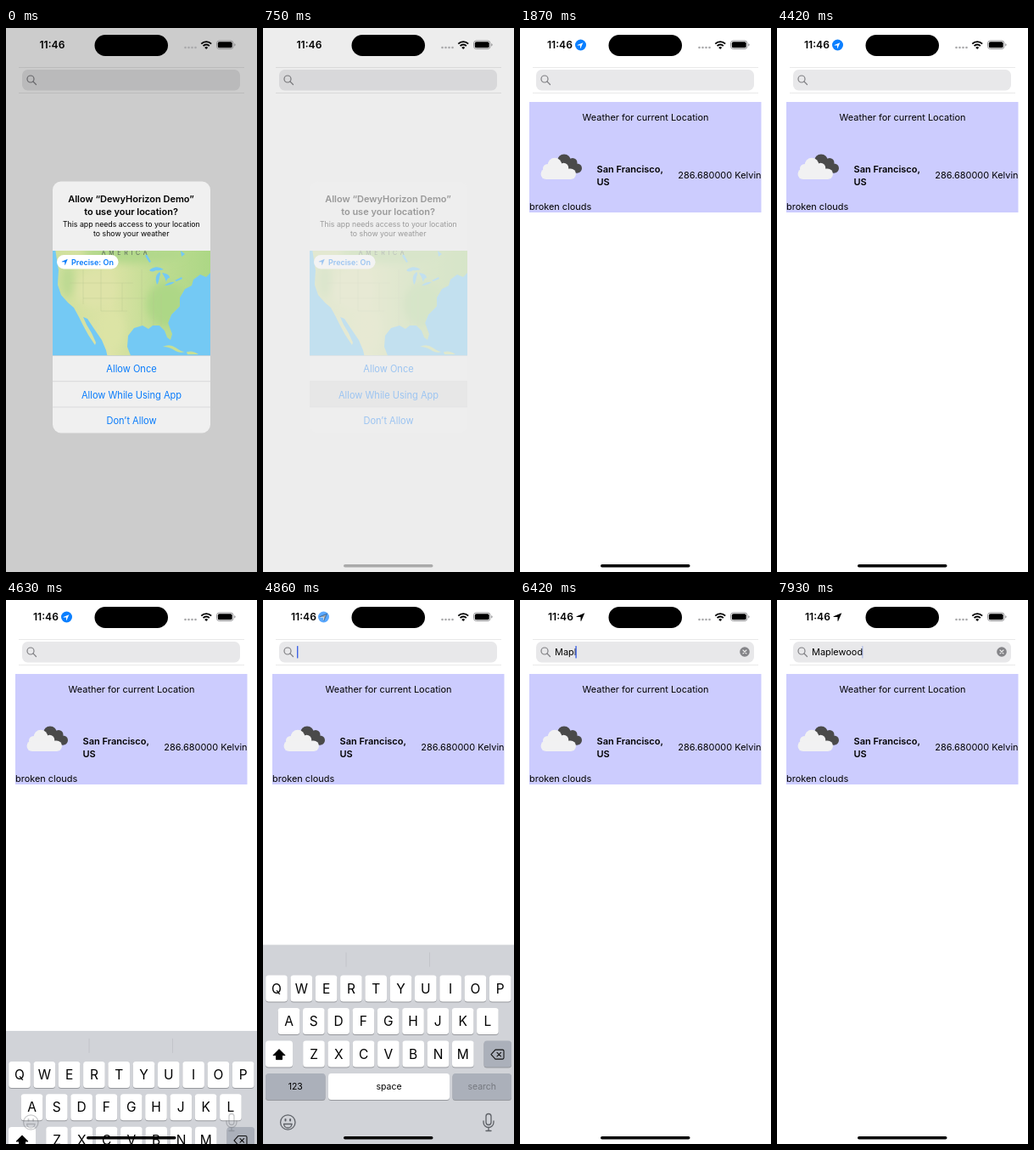
Recreate the animation shown at these times as an HTML page. Size 296 by 640 pixels, loop 8 s.

```html
<!DOCTYPE html>
<html lang="en">
<head>
<meta charset="utf-8">
<title>Weather search</title>
<style>
  html, body { margin: 0; width: 100%; height: 100%; overflow: hidden; background: #fff; }
  svg { display: block; width: 100vw; height: 100vh; }
  text { font-family: Inter, Roboto, sans-serif; font-size: 10.95px; white-space: pre; }
  .mid { text-anchor: middle; }
  .bold { font-weight: 600; }
  .title { font-size: 11px; font-weight: 600; }
  .sub { font-size: 8.75px; }
  .link { font-size: 11.05px; fill: #087bfb; }
  .letter { font-size: 15.5px; }
  .label { font-size: 10.5px; }
  .line { fill: none; stroke-linecap: round; stroke-linejoin: round; }
</style>
</head>
<body>
<svg viewBox="0 0 296 640" preserveAspectRatio="none">
  <defs>
    <clipPath id="mapClip"><rect x="55" y="262" width="186" height="123.5"/></clipPath>
    <clipPath id="landClip"><use href="#land"/></clipPath>
    <linearGradient id="terrain">
      <stop offset="0" stop-color="#cfe09c"/>
      <stop offset=".35" stop-color="#dde3a6"/>
      <stop offset=".65" stop-color="#bfdc92"/>
      <stop offset="1" stop-color="#acd785"/>
    </linearGradient>
    <filter id="soft"><feGaussianBlur stdDeviation="5"/></filter>
    <path id="arrow" d="M4.8-4.8 0.7 4.8Q0.2 5.4 0 4.6V0H-4.6Q-5.4-.2-4.8-.7Z"/>
  </defs>

  <rect width="296" height="640" fill="#fff"/>

  <!-- search bar -->
  <path d="M15 46.5H281M15 76.5H281" stroke="#e4e4e4" stroke-width=".8"/>
  <rect x="19" y="49" width="257" height="24.5" rx="6.5" fill="#e8e8ea"/>
  <g class="line" stroke="#808084" stroke-width="1.2">
    <circle cx="29" cy="60" r="4"/><path d="M32 63 35.5 66.5"/>
  </g>
  <text id="query" x="41" y="65"></text>
  <rect id="caret" y="54" width="1.4" height="14.5" rx=".5" fill="#3d62e6"/>
  <g id="clear">
    <circle cx="265" cy="61" r="5.8" fill="#848488"/>
    <path class="line" d="m263 59 4 4m0-4-4 4" stroke="#eee" stroke-width="1.1"/>
  </g>

  <!-- weather card -->
  <g id="card">
    <rect x="11" y="87" width="273.5" height="130" fill="#ccccfe"/>
    <text class="mid" x="148" y="109">Weather for current Location</text>
    <g id="cloud">
      <g fill="#4a4a4a">
        <circle cx="52" cy="156.500" r="8"/><circle cx="62" cy="158.500" r="5.500"/>
        <circle cx="67.500" cy="165" r="5.500"/><rect x="48" y="160" width="20" height="10.500"/>
      </g>
      <g fill="#f1f1f2">
        <circle cx="41" cy="161" r="8.300"/><circle cx="51.500" cy="164.500" r="5.700"/>
        <circle cx="32.500" cy="165.500" r="5.500"/>
        <rect x="24.500" y="165.500" width="41.500" height="12.500" rx="6.250"/>
      </g>
    </g>
    <text class="bold" x="90.500" y="169.500" style="font-size:11px">San Francisco,</text>
    <text class="bold" x="90.500" y="184.500" style="font-size:11px">US</text>
    <text x="284.500" y="177" text-anchor="end">286.680000 Kelvin</text>
    <text x="11" y="214">broken clouds</text>
  </g>

  <!-- keyboard -->
  <g id="keyboard">
    <rect y="405" width="296" height="240" fill="#d1d3d8"/>
    <path d="M98 414V431M196.500 414V431" stroke="#bfc1c7" stroke-width=".8"/>
    <g id="keys"></g>
    <path d="m19 528 7 7h-3.500v5h-7v-5H12Z" stroke="#000" stroke-linejoin="round"/>
    <path class="line" d="M274 528.500h8.500q1.500 0 1.500 1.500v8q0 1.500-1.500 1.500H274l-5-5.500Zm2 3.200 4.600 4.600m0-4.600-4.600 4.600" stroke="#111" stroke-width="1.100"/>
  </g>
  <g id="tools" class="line" stroke-width="1.300">
    <circle cx="29.300" cy="614.500" r="8.700"/>
    <path d="M24.500 616.500h9.600q-.8 4.500-4.800 4.500t-4.800-4.500Z"/>
    <path d="M26.500 611v1.400M32.100 611v1.400" stroke-width="2"/>
    <rect x="263" y="604.500" width="6" height="13" rx="3"/>
    <path d="M260 613v1.500a6 6 0 0 0 12 0V613M266 620.500v4M263 624.500h6"/>
  </g>
  <rect id="home" x="95" y="631" width="105.500" height="3.500" rx="1.750"/>
  <rect id="dim" width="296" height="640"/>

  <!-- status bar -->
  <text id="clock" class="bold" y="24.300" style="font-size:12.100px">11:46</text>
  <g id="badge" transform="translate(71.500 20)">
    <circle r="6.500" fill="#0a7fff"/>
    <use href="#arrow" transform="translate(-.5 .5) scale(.7)" fill="#fff"/>
  </g>
  <use id="pointer" href="#arrow" transform="translate(71.500 20)"/>
  <rect x="104.500" y="8" width="86.500" height="25" rx="12.500"/>
  <g fill="#a9a9ab">
    <circle cx="211.500" cy="23" r="1.300"/><circle cx="215.500" cy="23" r="1.300"/>
    <circle cx="219.500" cy="23" r="1.300"/><circle cx="223.500" cy="23" r="1.300"/>
  </g>
  <g fill="none" stroke="#000" stroke-width="1.900">
    <path d="M230.300 18.600a8.300 8.300 0 0 1 11.800 0M232.600 21.100a5 5 0 0 1 7.200 0"/>
    <path d="m236.200 25-2-2.100a2.800 2.800 0 0 1 4 0Z" fill="#000" stroke="none"/>
  </g>
  <rect x="248.500" y="15" width="19.500" height="9.600" rx="3" fill="none" stroke="#8d8d8f" stroke-width=".9"/>
  <rect x="249.800" y="16.300" width="16.900" height="7" rx="1.900"/>
  <path d="M269.300 18.200q1.300.4 1.300 1.600t-1.300 1.600Z" fill="#8d8d8f"/>

  <!-- permission alert -->
  <g id="alert">
    <rect x="55" y="180.500" width="186" height="296" rx="10" fill="#f0f0f0"/>
    <rect id="pressed" x="55" y="416" width="186" height="30" fill="#dedede"/>
    <g class="mid">
      <text class="title" x="147.500" y="205.300">Allow “DewyHorizon Demo”</text>
      <text class="title" x="147.500" y="220.200">to use your location?</text>
      <text class="sub" x="147.800" y="234.200">This app needs access to your location</text>
      <text class="sub" x="147.800" y="245.200">to show your weather</text>
    </g>
    <g clip-path="url(#mapClip)">
      <rect x="55" y="262" width="186" height="124" fill="#74c9f4"/>
      <path id="land" fill="url(#terrain)" d="M58 260 62 285 61 302 65 314 73 323 80 329 86 340 91 350 97 361 105 373 106 370 101 359 95 349 91 340 96 342 104 354 113 367 118 379 120 388H148L143 375 144 362 151 353 161 350 168 354 173 350 181 350 187 356 190 364 194 367 196 360 191 347 195 337 205 327 205 317 211 307 219 303 221 296 229 290 236 293 243 286V260Z"/>
      <g clip-path="url(#landClip)">
        <g filter="url(#soft)">
          <ellipse cx="150" cy="265" rx="60" ry="12" fill="#b2d88b"/>
          <ellipse cx="73" cy="297" rx="8" ry="20" fill="#bcd992"/>
          <ellipse cx="105" cy="307" rx="24" ry="22" fill="#dee3a8"/>
          <ellipse cx="125" cy="355" rx="14" ry="22" fill="#dce4a5"/>
          <ellipse cx="190" cy="325" rx="24" ry="26" fill="#add786"/>
        </g>
        <path d="M75 300H150M91 284V325M112 284V333M137 300V333M91 318H165M112 333H143M160 284V350M174 310V350M183 313V350" fill="none" stroke="#b9c68d" stroke-width=".4"/>
      </g>
      <g fill="#74c9f4">
        <path d="M169 285q8-7 17-1-7 2-9 1-5 3-8 0ZM178 302q-4-10 3-15 2 1 0 6-1 7-3 9ZM184 288q9 1 9 6-3 0-4 5-1-5-5-11ZM187 303q6-5 12-4-5 4-12 4ZM199 297l8-4 1 2-7 3ZM166 266l5 9-2 1-5-8ZM206 262l5 4-4 3Z"/>
      </g>
      <path d="M185 375q8-4 15 1t11 5q-6 2-11-1-7-5-15-5ZM213 381q8-2 14 3h-13Z" fill="#c6df96"/>
      <text class="mid" x="141.500" y="267" style="font-size:7px;letter-spacing:3.700px" fill="#59665c">AMERICA</text>
    </g>
    <rect x="60" y="267" width="72.500" height="16.500" rx="8.250" fill="#fff"/>
    <use href="#arrow" transform="translate(69.300 275.300) scale(.72)" fill="#087bfb"/>
    <text class="link bold" x="77" y="278.500" style="font-size:9px">Precise: On</text>
    <path d="M55 385.500H241M55 415.700H241M55 446H241" stroke="#cfcfd1" stroke-width=".7"/>
    <g class="mid">
      <text class="link" x="148" y="405">Allow Once</text>
      <text class="link" x="148" y="435.500">Allow While Using App</text>
      <text class="link" x="148" y="465.800">Don’t Allow</text>
    </g>
  </g>
</svg>
<script>
const $ = id => document.getElementById(id);
const clamp = x => Math.max(0, Math.min(1, x));
const show = (id, opacity) => $(id).setAttribute('opacity', +opacity);

function addKey(x, y, width, label, cls, fill = '#fff', ink = '#000') {
  const box = (top, color) =>
    `<rect x="${x}" y="${top}" width="${width}" height="31" rx="3.500" fill="${color}"/>`;
  const drop = cls === 'letter' ? 5.6 : 3.7;
  $('keys').innerHTML += box(y + 1, '#96989d') + box(y, fill) +
    `<text class="mid ${cls}" x="${x + width / 2}" y="${y + 15.5 + drop}" fill="${ink}">${label}</text>`;
}

[['QWERTYUIOP', 16], ['ASDFGHJKL', 30.5], ['ZXCVBNM', 60]].forEach(([row, first], r) =>
  [...row].forEach((c, i) => addKey(first + 29.3 * i - 12.8, 441 + 38.4 * r, 25.6, c, 'letter')));
const gray = '#abb0ba';
addKey(3, 518, 32, '', 'label');
addKey(260.5, 518, 32.5, '', 'label', gray);
addKey(3, 556.5, 70.5, '123', 'label', gray);
addKey(77, 556.5, 143, 'space', 'label');
addKey(223.5, 556.5, 69.5, 'search', 'label', gray, '#75787f');

const word = 'Maplewood';
const strokes = [5970, 6080, 6200, 6310, 6530, 6720, 6900, 7150, 7310];

// Critically damped spring, time in ms
const spring = ms => ms < 0 ? 0 : 1 - (1 + .019 * ms) * Math.exp(-.019 * ms);
// Hold motion on 110 ms ticks counted from start
const tick = (t, start) => start + 110 * Math.floor((t - start) / 110);

function caretOpacity(t) {
  if (t < 4640) return 0;
  if (t >= 5360 && t < 5860) return t < 5480 ? .4 : 0;
  return t < 7930 ? 1 : .3;
}

function draw(t) {
  const fade = tick(t, 640);
  const left = t < 640 ? 1 : t < 1190 ? Math.exp((620 - fade) / 124) : 0;
  show('alert', left);
  show('dim', .2 * left);
  show('pressed', t >= 500);
  show('home', clamp((fade - 640) / 390));
  show('card', t >= 1190);
  show('cloud', t >= 1870);

  const blue = t < 1870 ? 0 : 1 - clamp((tick(t, 4420) - 4750) / 330);
  show('badge', blue);
  show('pointer', t < 1870 ? 0 : 1 - blue);
  $('clock').setAttribute('x', t < 1870 ? 39.5 : t < 4860 ? 32 : 33);

  const rise = tick(t, 4420), fall = tick(t, 5860);
  const up = t >= 6530 ? 0 : spring(rise - 4430) - (t < 5860 ? 0 : spring(fall - 5823));
  $('keyboard').setAttribute('transform', `translate(0 ${235 * (1 - up)})`);
  show('keyboard', up > 0);
  show('tools', clamp((rise - 4430) / 300) * (1 - clamp((fall - 5860) / 220)));
  $('tools').setAttribute('stroke', t < 5860 ? '#5d6066' : '#111');

  const query = $('query');
  query.textContent = word.slice(0, strokes.filter(s => t >= s).length);
  const width = query.textContent ? query.getComputedTextLength() : 0;
  $('caret').setAttribute('x', 40 + width);
  show('caret', caretOpacity(t));
  show('clear', width > 0);
}

function loop() {
  draw(performance.now() % 8000);
  requestAnimationFrame(loop);
}
loop();
</script>
</body>
</html>
```
